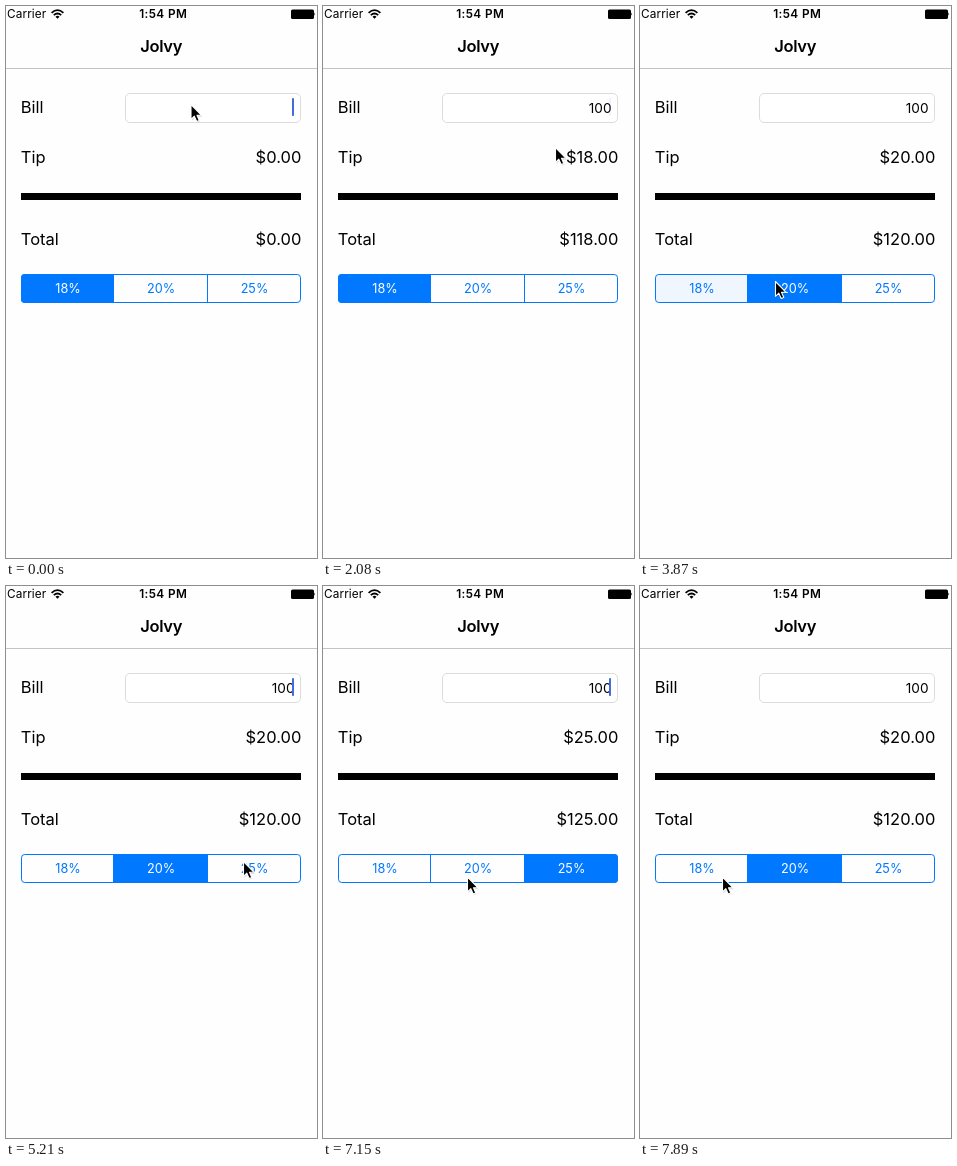
These frames come from a looping animation (311 px wide and 552 px high, 8 s). An HTML page:

```html
<!DOCTYPE html>
<html lang="en">
<head>
<meta charset="utf-8">
<title>Tip calculator</title>
<style>
  html, body { margin: 0; width: 100%; height: 100%; overflow: hidden; background: #fefefe; }
  svg { display: block; width: 100%; height: 100%; }
  text { font-family: Inter, Roboto, sans-serif; font-size: 16.5px; }
  .status { font-size: 11.8px; letter-spacing: .1px; }
  .clock { font-size: 11.8px; letter-spacing: .4px; }
  .title { letter-spacing: -.3px; }
  .bold { font-weight: 600; }
  .mid { text-anchor: middle; }
  .end { text-anchor: end; }
  .field { font-size: 13.6px; }
  .seg { font-size: 12.7px; text-anchor: middle; }
</style>
</head>
<body>
<svg viewBox="0 0 311 552">
  <defs>
    <clipPath id="pill"><rect x="15" y="268" width="280" height="29" rx="3.8"/></clipPath>
  </defs>
  <rect width="311" height="552" fill="#fefefe"/>

  <text class="status" x="1" y="12.4">Carrier</text>
  <g fill="none" stroke="#000" stroke-width="1.8">
    <path d="M45.6 6.8Q51.5 1.4 57.4 6.8"/>
    <path d="M47.8 9.2Q51.5 5.8 55.2 9.2"/>
  </g>
  <path d="M49.5 10.7Q51.5 9 53.5 10.7L51.5 12.8Z"/>
  <text class="clock bold mid" x="157.2" y="12.4">1:54 PM</text>
  <rect x="285" y="3.5" width="23" height="9.5" rx="1.6"/>
  <path d="M308.4 6.6Q310 8.2 308.4 9.8Z"/>

  <text class="title bold mid" x="155.2" y="46">Jolvy</text>
  <rect y="62" width="311" height="1" fill="#c4c4c4"/>

  <text x="14.8" y="107.4">Bill</text>
  <rect x="119.5" y="87.5" width="175" height="29" rx="4.5" fill="#fff" stroke="#dcdcdc"/>
  <text id="bill" class="field end" x="288.5" y="106.8"></text>
  <rect id="caret" x="286" y="92" width="2" height="18" rx=".8" fill="#426bdf"/>

  <text x="14.8" y="157.4">Tip</text>
  <text id="tip" class="end" x="295.3" y="157.4"></text>
  <rect x="15" y="187" width="280" height="7"/>
  <text x="14.8" y="239.4">Total</text>
  <text id="total" class="end" x="295.3" y="239.4"></text>

  <g id="segments" clip-path="url(#pill)"></g>
  <g fill="none" stroke="#0078ff">
    <rect x="15.5" y="268.5" width="279" height="28" rx="3.3"/>
    <path d="M107.5 268V297M201.5 268V297"/>
  </g>
  <g id="labels"></g>

  <g id="cursor">
    <path d="M.8 1.8V16.2L4 13.2L6.3 18L9 16.9L6.9 12.3H11.4Z" opacity=".14"/>
    <path d="M0 0V14.8L3.3 11.7L5.7 17L8.3 15.9L6 10.8H10.6Z" stroke="#fff" stroke-width="1.1" stroke-linejoin="round"/>
  </g>
</svg>
<script>
const LOOP = 8000, FRAME = 148.5, BLINK = 990;
const BLUE = '#0078ff';
const RATES = [18, 20, 25];
const AMOUNT = '100';
const KEY_TIMES = [740, 890, 1180];
const TAPS = [
  { time: 0, segment: 0 },
  { time: 3850, segment: 1 },
  { time: 5330, segment: 2 },
  { time: 7420, segment: 1 }
];
const HOME = { x: 185, y: 98.5 };
const MOVES = [
  { from: 0, to: 297, x: 232.5, y: 133 },
  { from: 1780, to: 2079, x: 232.5, y: 141.5 },
  { from: 2079, to: 2820, x: 135.5, y: 275.5 },
  { from: 4160, to: 4750, x: 237.5, y: 275.5 },
  { from: 6540, to: 7128, x: 144.5, y: 291 },
  { from: 7425, to: 7860, x: 82.5, y: 291 }
];

const $ = id => document.getElementById(id);
const money = n => '$' + n.toFixed(2);
const ramp = (t, from, to) => Math.min(1, Math.max(0, (t - from) / (to - from)));
const ease = p => p * p * (3 - 2 * p);

function pointer(t) {
  return MOVES.reduce((pos, move) => {
    const p = ease(ramp(t, move.from, move.to));
    return { x: pos.x + (move.x - pos.x) * p, y: pos.y + (move.y - pos.y) * p };
  }, HOME);
}

// The caret stays lit while typing and blinks otherwise.
function caret(t) {
  const typing = t >= KEY_TIMES[0], done = t >= KEY_TIMES.at(-1);
  if (typing && !done) return 1;
  const phase = (t + (typing ? 0 : 485)) % BLINK;
  return ramp(phase, 90, 195) - ramp(phase, 620, 765);
}

function add(parent, tag, attrs) {
  const node = document.createElementNS('http://www.w3.org/2000/svg', tag);
  for (const key in attrs) node.setAttribute(key, attrs[key]);
  return parent.appendChild(node);
}

const edge = i => Math.round(15 + i * 280 / RATES.length - .4);
const segments = RATES.map((rate, i) => {
  const x = edge(i), width = edge(i + 1) - x;
  const fill = add($('segments'), 'rect', { x, y: 268, width, height: 29, fill: BLUE });
  const label = add($('labels'), 'text', { x: x + width / 2 + .5, y: 287.2, class: 'seg' });
  label.textContent = rate + '%';
  return { fill, label };
});

function draw(t) {
  const bill = AMOUNT.slice(0, KEY_TIMES.filter(key => key <= t).length);
  const index = TAPS.findLastIndex(tap => tap.time <= t);
  const { time, segment } = TAPS[index];
  const previous = TAPS[index - 1]?.segment;
  const tint = .065 * (1 - ramp(t, time, time + 150));
  const tip = bill * RATES[segment] / 100;
  const { x, y } = pointer(t);

  $('bill').textContent = bill;
  $('tip').textContent = money(tip);
  $('total').textContent = money(+bill + tip);
  $('caret').style.opacity = caret(t);
  $('cursor').setAttribute('transform', `translate(${x} ${y})`);
  segments.forEach(({ fill, label }, i) => {
    fill.style.opacity = i === segment ? 1 : i === previous ? tint : 0;
    label.style.fill = i === segment ? '#fff' : BLUE;
  });
}

// The picture advances in held steps, like a screen recording.
const start = performance.now();
function tick() {
  const t = (performance.now() - start) % LOOP;
  draw(Math.floor(t / FRAME) * FRAME);
  requestAnimationFrame(tick);
}
tick();
</script>
</body>
</html>
```
